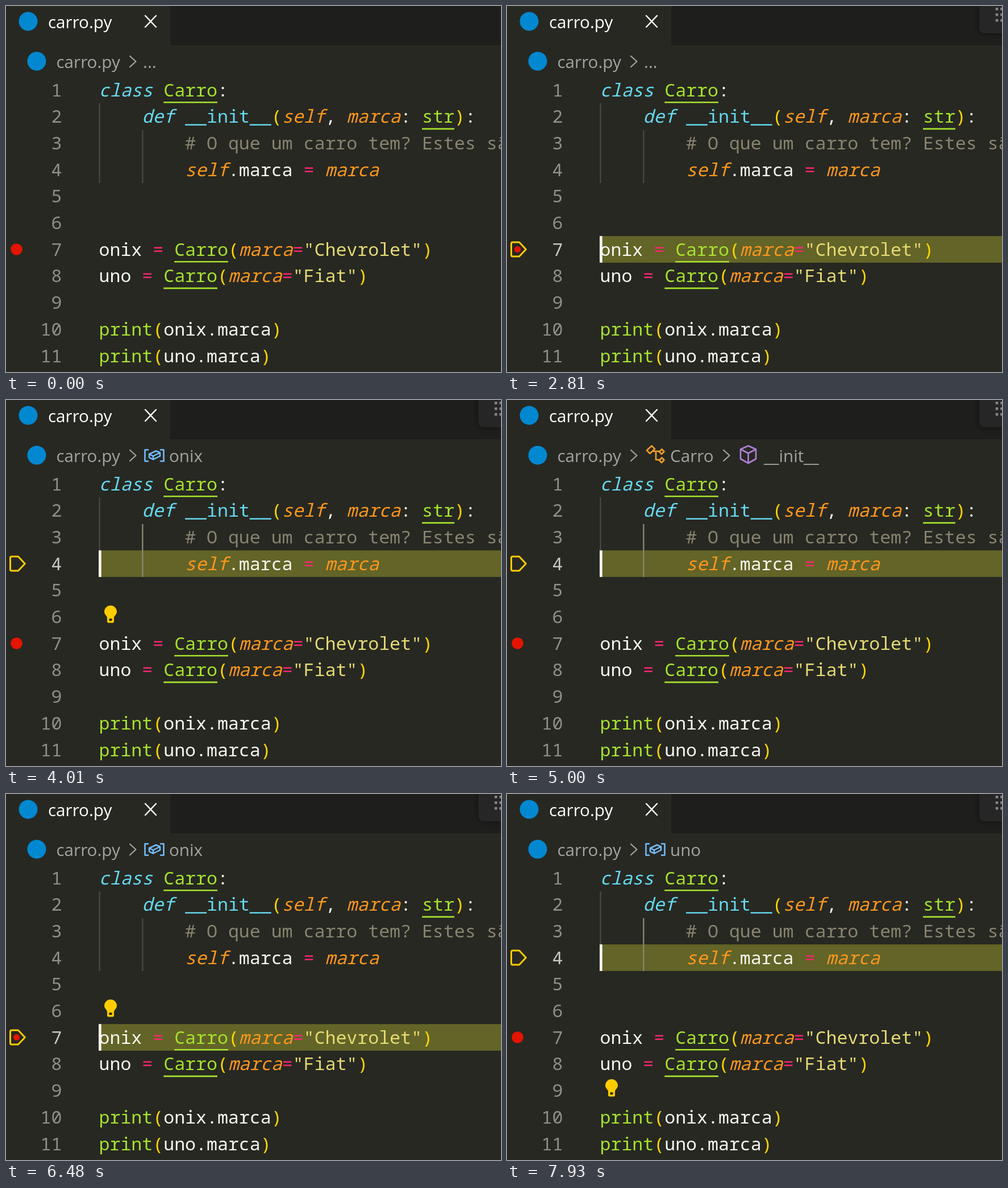
Animation of 871x643 px, one loop 8 s. Source, as an HTML page:

```html
<!DOCTYPE html>
<html lang="pt">
<head>
<meta charset="utf-8">
<title>carro.py</title>
<style>
  html, body { margin: 0; width: 100%; height: 100%; overflow: hidden; background: #272822; }
  svg { display: block; width: 100%; height: 100%; }
  .code { font: 31.58px "Noto Sans Mono", "DejaVu Sans Mono", monospace; white-space: pre; }
  .ui { font: 29.6px "Open Sans", "Noto Sans", sans-serif; fill: #a3a49f; }
  .line { fill: none; stroke-linecap: round; stroke-linejoin: round; }
  .w { fill: #f8f8f2; }
  .k { fill: #66d9ef; }
  .i { font-style: italic; }
  .g { fill: #a6e22e; }
  .o { fill: #fd971f; font-style: italic; }
  .p { fill: #f92672; }
  .y { fill: #ffd700; }
  .s { fill: #e6db74; }
  .c { fill: #88846f; }
</style>
</head>
<body>
<svg viewBox="0 0 871 643" preserveAspectRatio="none">
  <defs>
    <filter id="shadow" x="-50%" y="-50%" width="200%" height="200%">
      <feDropShadow dx="0" dy="0" stdDeviation="6" flood-color="#000" flood-opacity=".5"/>
    </filter>
    <path id="chevron" class="line" d="M1 1 11.5 10.5 1 20" stroke="#a3a49f" stroke-width="2.2"/>
  </defs>
  <rect width="871" height="643" fill="#272822"/>
  <rect x="289" width="582" height="69" fill="#1e1f1c"/>
  <circle cx="39" cy="27" r="16.5" fill="#0288d1"/>
  <text class="ui" x="74" y="39" style="fill:#fff">carro.py</text>
  <path class="line" d="M245 17 264 37M264 17 245 37" stroke="#fff" stroke-width="2.4"/>

  <g id="toolbar">
    <rect x="831" y="-20" width="80" height="68" rx="9" fill="#272726" filter="url(#shadow)"/>
    <path d="M862 3v25M870.5 3v25" stroke="#858585" stroke-width="4.6" stroke-dasharray="4.6 5.4"/>
  </g>

  <circle cx="54" cy="97" r="16.5" fill="#0288d1"/>
  <text class="ui" x="88.5" y="109">carro.py</text>
  <use href="#chevron" x="217" y="87"/>
  <text class="ui" id="dots" x="241" y="109">...</text>
  <g id="variable">
    <g class="line" stroke="#75beff" stroke-width="2.5">
      <path d="M250 87.5h-5.5v20h5.5M272 87.5h5.5v20H272"/>
      <path d="M252 95 264 89.5 271 92.5V98.5L259 104.5 252 101zM252 95 259 98.5 271 92.5M259 98.5V104.5"/>
    </g>
    <text class="ui" id="symbol" x="287" y="109"></text>
  </g>
  <g id="method">
    <g class="line" stroke="#ee9d28" stroke-width="2.6">
      <path d="M246 88.5 254.5 80.5 260 86 251.5 94zM257 90H268M262 90V105H268"/>
      <path d="M268 91 272.5 86.5 276.5 90.5 272 95zM268 106 272.5 101.5 276.5 105.5 272 110z"/>
    </g>
    <text class="ui" x="287" y="109">Carro</text>
    <use href="#chevron" x="380" y="87"/>
    <path class="line" d="M424.5 80.5 438 86.5V103.5L424.5 111 411 103.5V86.5zM411 86.5 424.5 93.5 438 86.5M424.5 93.5V111" stroke="#b180d7" stroke-width="2.6"/>
    <text class="ui" x="452" y="109">__init__</text>
  </g>

  <rect id="band" x="163" width="708" height="46.7" fill="#636427"/>
  <path d="M164.5 171V311" stroke="#464741" stroke-width="2.4"/>
  <path id="guide" d="M240.3 218V311" stroke-width="2.4"/>
  <g id="lines"></g>
  <circle id="stop" cx="18.5" cy="427.5" fill="#e51400"/>
  <path id="arrow" class="line" d="M10 -12.5H21.5L33.3 0 21.5 12.5H10Q7.5 12.5 7.5 10V-10Q7.5 -12.5 10 -12.5z" stroke="#ffcc00" stroke-width="3"/>
  <g id="bulb">
    <path d="M184 3.5A11 11 0 0 1 195 14.5C195 19.5 190.5 21 190 25V31.5Q190 34 187.5 34H180.5Q178 34 178 31.5V25C177.5 21 173 19.5 173 14.5A11 11 0 0 1 184 3.5z" fill="#ffcc00"/>
    <path d="M181.5 26.5h5v4h-5z" fill="#272822"/>
  </g>
  <rect id="caret" x="163" width="4.7" height="46.7" fill="#f8f8f0"/>
</svg>
<script>
const LOOP = 8000, LEFT = 163.5, PITCH = 18.95;
const $ = id => document.getElementById(id);
const lineTop = n => 124.2 + (n - 1) * 46.67;

// Each token is [class, text]; a leading "_" on the class underlines it.
const makeCar = (name, brand) => [
  ['w', name + ' '], ['p', '= '], ['_g', 'Carro'], ['y', '('], ['o', 'marca'],
  ['p', '='], ['s', `"${brand}"`], ['y', ')']
];
const printCar = name => [['g', 'print'], ['y', '('], ['w', name + '.marca'], ['y', ')']];
const code = [
  [['k i', 'class '], ['_g', 'Carro'], ['w', ':']],
  [['k i', '    def '], ['k', '__init__'], ['y', '('], ['o', 'self'], ['w', ', '], ['o', 'marca'],
   ['w', ': '], ['_g', 'str'], ['y', ')'], ['w', ':']],
  [['c', '        # O que um carro tem? Estes são']],
  [['o', '        self'], ['w', '.marca '], ['p', '= '], ['o', 'marca']],
  [], [],
  makeCar('onix', 'Chevrolet'),
  makeCar('uno', 'Fiat'),
  [],
  printCar('onix'),
  printCar('uno')
];

$('lines').innerHTML = code.map((tokens, k) => {
  const y = lineTop(k + 1), base = y + 34.6;
  let col = 0;
  let out = `<text class="code num" x="98.5" y="${base}" text-anchor="end">${k + 1}</text>`;
  for (const [kind, text] of tokens) {
    const skip = text.length - text.trimStart().length;
    const x = LEFT + (col + skip) * PITCH;
    out += `<text class="code ${kind.replace('_', '')}" x="${x}" y="${base}">${text.trim()}</text>`;
    if (kind[0] === '_')
      out += `<path d="M${x} ${y + 45}h${text.length * PITCH}" stroke="#a6e22e" stroke-width="2.6"/>`;
    col += text.length;
  }
  return out;
}).join('');
const numbers = [...document.querySelectorAll('.num')];

// Step tracks: [start in ms, value]
const tracks = {
  toolbar: [[0, false], [750, true]],
  row: [[0, 0], [2810, 7], [4010, 4], [5590, 7], [6870, 8], [7930, 4]],
  caret: [[0, false], [2810, true], [3270, false], [3730, true], [4470, false], [5000, true],
          [5460, false], [5590, true], [5990, false], [6480, true], [7400, false], [7860, true]],
  crumb: [[0, '...'], [2880, 'onix'], [4150, 'method'], [5590, '...'], [5740, 'onix'], [7060, 'uno']],
  bulb: [[0, 0], [3010, 6], [4270, 0], [5860, 6], [7130, 0], [7260, 9]]
};
const at = (track, t) => track.reduce((v, [start, next]) => t >= start ? next : v, track[0][1]);
const show = (id, on) => $(id).setAttribute('visibility', on ? 'visible' : 'hidden');

function draw(t) {
  const s = {};
  for (const key in tracks) s[key] = at(tracks[key], t);
  const y = lineTop(s.row || 1);

  show('toolbar', s.toolbar);
  show('dots', s.crumb === '...');
  show('method', s.crumb === 'method');
  show('variable', s.crumb === 'onix' || s.crumb === 'uno');
  $('symbol').textContent = s.crumb;

  for (const id of ['band', 'arrow']) show(id, s.row);
  show('caret', s.caret);
  $('band').setAttribute('y', y);
  $('caret').setAttribute('y', y);
  $('arrow').setAttribute('transform', `translate(0 ${y + 23.2})`);
  $('stop').setAttribute('r', s.row === 7 ? 5.6 : 10.3);
  $('guide').setAttribute('stroke', s.row === 4 ? '#85866f' : '#464741');
  numbers.forEach((n, k) => n.setAttribute('fill', k + 1 === s.row ? '#c8c8c4' : '#90908a'));

  show('bulb', s.bulb);
  $('bulb').setAttribute('transform', `translate(0 ${lineTop(s.bulb || 6)})`);
}

const begin = performance.now();
function tick() {
  draw((performance.now() - begin) % LOOP);
  requestAnimationFrame(tick);
}
tick();
</script>
</body>
</html>
```
